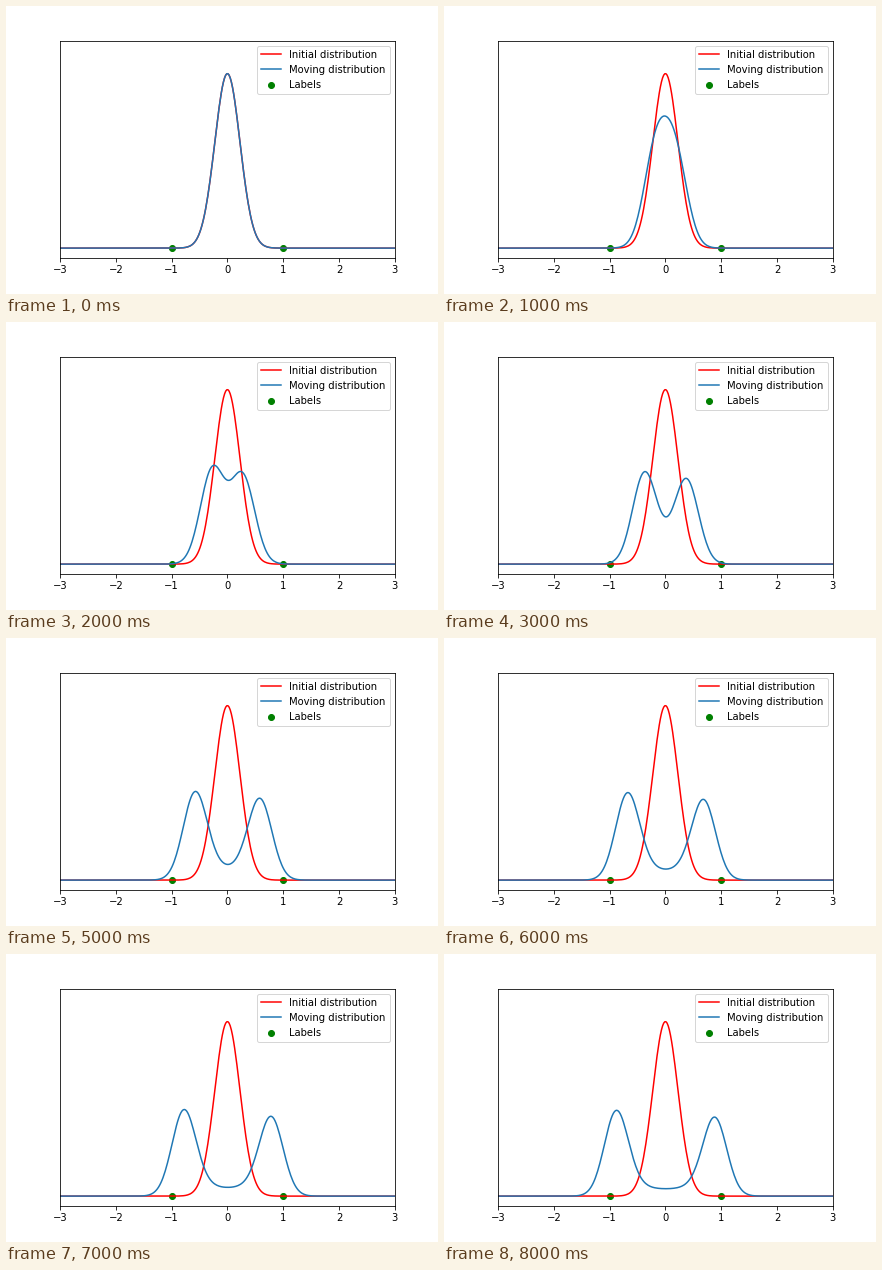
Recreate the animation shown at these times as a matplotlib script. Size 432 px wide and 288 px high, loop 9000 ms.

```python
import numpy as np
import matplotlib.pyplot as plt
from matplotlib.animation import FuncAnimation

FRAMES = 9
STEP = 0.1         # distance travelled per frame away from the split
SOFTNESS = 0.015   # width of the soft split between the two labels
SPLIT = 0.005
SPREAD = 0.105
BANDWIDTH = 0.2

# Evenly spaced particles weighted by a normal density
start = np.linspace(-0.5, 0.5, 4001)
weights = np.exp(-0.5 * (start / SPREAD) ** 2)
weights /= weights.sum()
heading = np.tanh((start - SPLIT) / SOFTNESS)
grid = np.linspace(-3, 3, 300)


def density(points):
    z = (grid[:, None] - points) / BANDWIDTH
    kernel = np.exp(-0.5 * z ** 2) / (BANDWIDTH * np.sqrt(2 * np.pi))
    return kernel @ weights


curves = [density(start + STEP * k * heading) for k in range(FRAMES)]

fig, ax = plt.subplots(figsize=(6, 4), dpi=72)
fig.subplots_adjust(bottom=0.125)
ax.plot(grid, curves[0], color="red", label="Initial distribution")
moving, = ax.plot(grid, curves[0], color="tab:blue", label="Moving distribution")
ax.scatter([-1, 1], [0, 0], color="green", label="Labels")
ax.set_xlim(-3, 3)
ax.set_ylim(-0.1, 2.1)
ax.set_yticks([])
ax.legend(loc="upper right")


def update(k):
    moving.set_ydata(curves[k])
    return moving,


anim = FuncAnimation(fig, update, frames=FRAMES, interval=1000,
                     repeat=True, repeat_delay=0)
plt.show()
```
